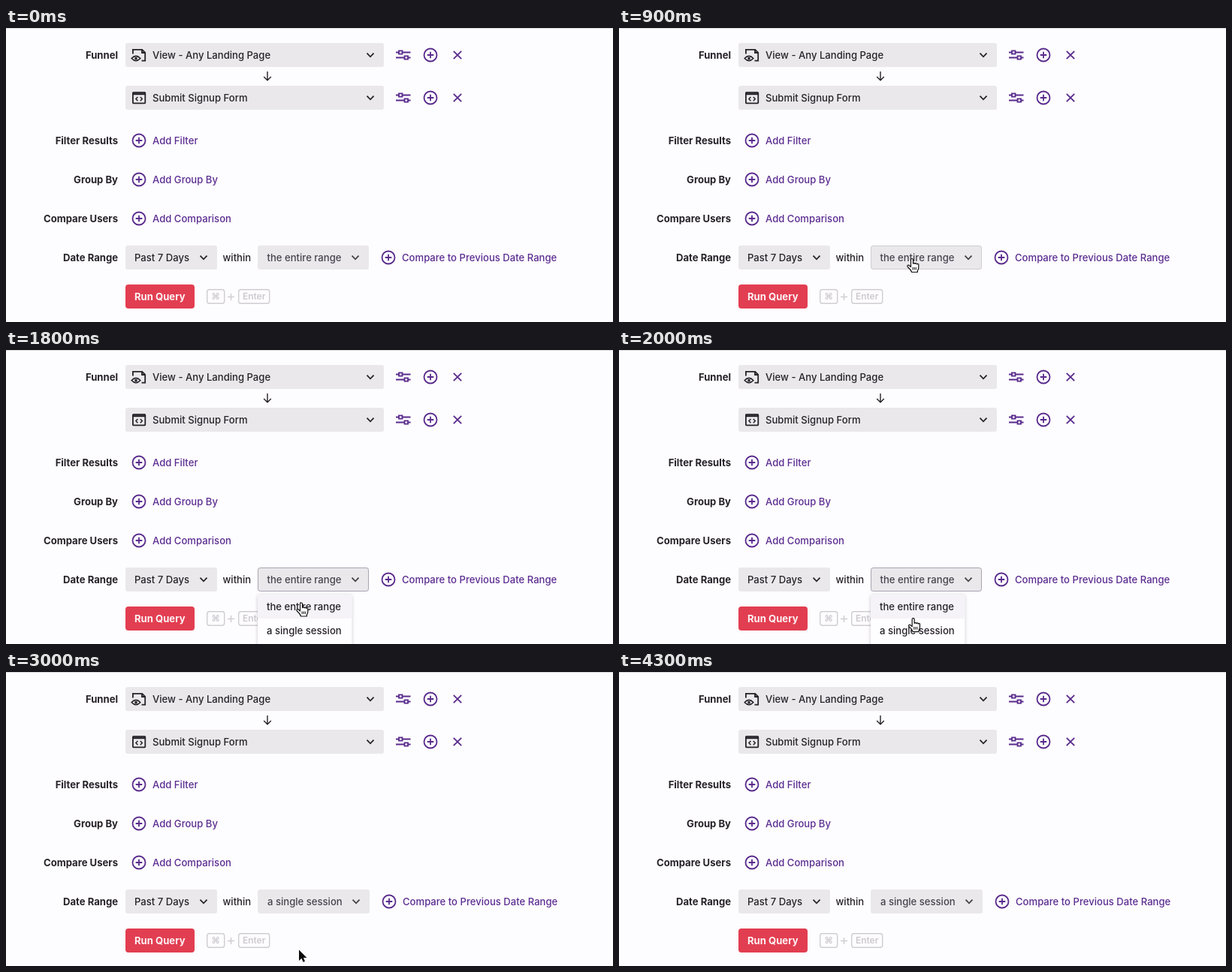
An HTML page that plays this animation: 808x392 px, repeating every 4900 ms.

```html
<!DOCTYPE html>
<html lang="en">
<head>
<meta charset="utf-8">
<title>Funnel query</title>
<style>
  html, body { margin: 0; width: 100%; height: 100%; overflow: hidden; background: #fdfcfe; }
  svg { display: block; }
  text { font: 500 13.1px Inter, "Liberation Sans", sans-serif; fill: #262229; }
  .label { font-weight: 700; text-anchor: end; }
  .link { fill: #5b2d91; }
  .muted { fill: #48434d; }
  .run { font-weight: 700; fill: #fdf3f5; }
  .key { font-weight: 600; font-size: 12px; fill: #cdcad0; text-anchor: middle; }
  .box { fill: #eae8eb; }
  .line { fill: none; stroke: #262229; stroke-width: 1.8; }
  .purple { fill: none; stroke: #582a8c; stroke-width: 1.8; }
  .keycap { fill: none; stroke: #d0cdd3; stroke-width: 1.4; }
  .panel { fill: #fefdff; filter: drop-shadow(0 1px 2px rgba(40, 30, 55, .25)); }
  #hover { fill: #f5f3f7; }
</style>
</head>
<body>
<svg width="808" height="392" viewBox="0 0 808 392">
  <defs>
    <g id="plus" class="purple">
      <circle r="8.5"/>
      <path d="M-4.3 0H4.3M0-4.3V4.3"/>
    </g>
    <path id="chevron" class="line" d="M-4.5-2.3L0 2.3L4.5-2.3"/>
    <g id="tools">
      <path class="purple" d="M-10-3.5H-6M-1.5-3.5H9.5M-10 3.5H1.5M6 3.5H9.5M-6-5.7H-1.5V-1.3H-6ZM1.5 1.3H6V5.7H1.5Z"/>
      <use href="#plus" x="36"/>
      <path class="purple" d="M66.8-5.2L77.2 5.2M77.2-5.2L66.8 5.2"/>
    </g>
  </defs>

  <rect width="808" height="392" fill="#fdfcfe"/>
  <rect width="808" height="1" fill="#dddbe0"/>

  <text class="label" x="149" y="41">Funnel</text>
  <text class="label" x="149" y="155">Filter Results</text>
  <text class="label" x="149" y="207">Group By</text>
  <text class="label" x="149" y="259">Compare Users</text>
  <text class="label" x="149" y="311">Date Range</text>

  <rect class="box" x="159" y="20" width="344" height="32" rx="3"/>
  <g class="line">
    <path d="M168.9 34.5V28.8H181.2L185.2 32.8V43.7H180.5M181 29V33H185"/>
    <path d="M167.2 40.5Q173 34.2 178.8 40.5Q173 46.8 167.2 40.5Z" stroke-width="1.6"/>
    <circle cx="173" cy="40.5" r="1.1" stroke-width="1.5"/>
  </g>
  <text x="195" y="41">View - Any Landing Page</text>
  <use href="#chevron" x="485" y="36"/>
  <use href="#tools" x="529" y="36"/>

  <path class="line" style="stroke-width:1.4" d="M348 58V69.5M343.2 65L348 69.8L352.8 65"/>

  <rect class="box" x="159" y="77" width="344" height="32" rx="3"/>
  <g class="line">
    <rect x="168.9" y="85.9" width="16.4" height="14.4" rx=".8"/>
    <path d="M169 88H185" stroke-width="2.4"/>
    <path d="M175.4 92L172.9 94.6L175.4 97.2M178.8 92L181.3 94.6L178.8 97.2" stroke-width="1.5"/>
  </g>
  <text x="195" y="98">Submit Signup Form</text>
  <use href="#chevron" x="485" y="93"/>
  <use href="#tools" x="529" y="93"/>

  <use href="#plus" x="177" y="150"/>
  <text class="link" x="195" y="155">Add Filter</text>
  <use href="#plus" x="177" y="202"/>
  <text class="link" x="195" y="207">Add Group By</text>
  <use href="#plus" x="177" y="254"/>
  <text class="link" x="195" y="259">Add Comparison</text>

  <rect class="box" x="159" y="290" width="122" height="32" rx="3"/>
  <text x="171" y="311">Past 7 Days</text>
  <use href="#chevron" x="263" y="306"/>
  <text x="288.5" y="311">within</text>
  <rect id="field" class="box" x="335" y="290" width="148" height="32" rx="3"/>
  <rect id="border" x="335.5" y="290.5" width="147" height="31" rx="3" fill="none" stroke="#aaa4b4"/>
  <text id="value" class="muted" x="347.5" y="311">the entire range</text>
  <g id="after">
    <use href="#chevron" x="465" y="306" opacity=".85"/>
    <use href="#plus" x="509" y="306"/>
    <text class="link" x="527" y="311">Compare to Previous Date Range</text>
  </g>

  <rect x="159" y="342" width="92" height="32" rx="4" fill="#e23e51"/>
  <text class="run" x="171" y="363">Run Query</text>
  <rect class="keycap" x="267.7" y="348.7" width="23" height="18.6" rx="3"/>
  <text class="key" x="279.2" y="362">⌘</text>
  <path class="keycap" d="M295 358.5H304M299.5 354V363"/>
  <rect class="keycap" x="309.7" y="348.7" width="41" height="18.6" rx="3"/>
  <text class="key" x="330.2" y="362.3">Enter</text>

  <g id="menu">
    <rect class="panel" x="335" y="326" width="125.5" height="72" rx="3"/>
    <rect id="hover" x="335" y="326" width="125.5" height="32"/>
    <text x="347" y="347">the entire range</text>
    <text x="347" y="379">a single session</text>
  </g>

  <g id="cursor" stroke-linejoin="round">
    <circle id="ring" r="29.3" fill="none" stroke="#0c0c0c" stroke-width="2.6"/>
    <g id="hand" transform="translate(-6.5 -.5)" stroke="#111" stroke-width="1.2">
      <path fill="#fff" d="M5 11.6V2a1.5 1.5 0 0 1 3 0V7.2a1.4 1.4 0 0 1 2.6.3a1.3 1.3 0 0 1 2.5.6a1.2 1.2 0 0 1 2.2 1V12.5q0 2-1.4 4V18.5H6q-.5-2-2.3-4L.8 11.5q-1-1.6.3-2.2q1.2-.4 2.4 1Z"/>
      <path fill="none" stroke-width="1" d="M7.6 12V15.5M9.7 12V15.5M11.8 12V15.5"/>
    </g>
    <path id="arrow" d="M0 0V14.5L3.4 11.3L5.6 16.3L8 15.2L5.9 10.4H10.4Z" fill="#0c0c0c" stroke="#fff" stroke-width="1.2" paint-order="stroke"/>
  </g>
</svg>
<script>
  const LOOP = 4900, STEP = 100;
  const $ = id => document.getElementById(id);
  const show = (id, on) => { $(id).style.display = on ? "" : "none"; };

  // time, x, y of the pointer's hot spot
  const path = [
    [100, 389, 392], [600, 389, 314], [900, 390, 307.5], [1200, 396, 303],
    [1400, 394, 328], [1500, 394, 328], [1800, 393, 337],
    [2100, 391, 368], [2200, 391, 371.5], [2400, 391, 371.5], [2900, 390, 370.5]
  ];

  function pointerAt(t) {
    const i = path.findIndex(p => p[0] >= t);
    if (i < 0) return path[path.length - 1].slice(1);
    if (i === 0) return path[0].slice(1);
    const [t0, x0, y0] = path[i - 1], [t1, x1, y1] = path[i];
    const k = (t - t0) / (t1 - t0);
    return [x0 + (x1 - x0) * k, y0 + (y1 - y0) * k];
  }

  function draw(t) {
    const within = (a, b) => t >= a && t < b;
    const [x, y] = pointerAt(t);
    const open = within(1200, 2600), chosen = t >= 2600;
    const onField = y >= 290 && y <= 322;

    $("cursor").setAttribute("transform", `translate(${x} ${y})`);
    $("cursor").style.opacity = within(100, 3500) ? 1 : within(3500, 3600) ? 0.5 : 0;
    show("hand", open || onField);
    show("arrow", !open && !onField);
    show("ring", within(1000, 1200) || within(2400, 2600));

    show("menu", open);
    show("hover", open && y > 326);
    $("hover").setAttribute("y", y < 358 ? 326 : 358);

    show("border", onField || within(1200, 2200));
    $("border").style.opacity = open ? 1 : 0.4;
    $("field").setAttribute("width", chosen ? 149 : 148);
    $("value").textContent = chosen ? "a single session" : "the entire range";
    $("value").setAttribute("x", chosen ? 348 : 347.5);
    $("after").setAttribute("transform", `translate(${chosen ? 1 : 0} 0)`);
  }

  const start = performance.now();
  function tick() {
    const t = (performance.now() - start) % LOOP;
    draw(Math.floor(t / STEP) * STEP);
    requestAnimationFrame(tick);
  }
  tick();
</script>
</body>
</html>
```
